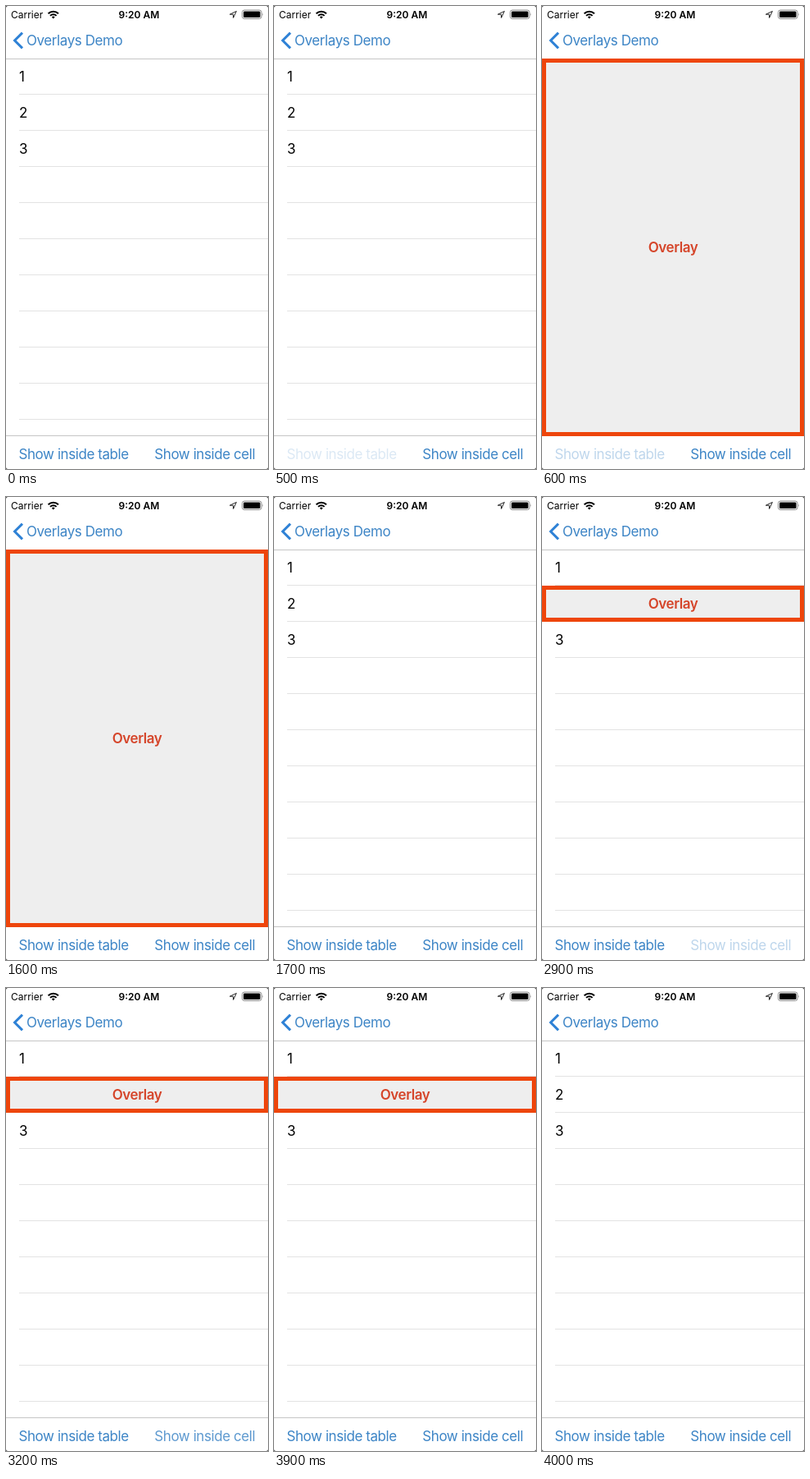
Write an HTML page that moves like this. It is 320x564 px and loops after 4.4 s.

```html
<!DOCTYPE html>
<html lang="en">
<head>
<meta charset="utf-8">
<title>Overlays Demo</title>
<style>
  html, body { margin: 0; width: 100%; height: 100%; overflow: hidden; background: #333; }
  svg { display: block; width: 100%; height: 100%; }
  text { font: 17px Inter, Roboto, sans-serif; letter-spacing: -.43px; }
  .status { font-size: 12px; letter-spacing: 0; }
  .bold { font-weight: 600; }
  .link { fill: #3d85c6; }
</style>
</head>
<body>
<svg viewBox="0 0 320 564">
  <rect width="320" height="564" rx="2.5" fill="#fff"/>

  <!-- status bar -->
  <text class="status" x="6" y="14.5">Carrier</text>
  <g fill="none" stroke="#000" stroke-width="2">
    <path d="M51.6 9.3a8.6 8.6 0 0 1 12.4 0"/>
    <path d="M54 11.9a5.4 5.4 0 0 1 7.6 0"/>
  </g>
  <path d="M55.9 13.4a2.8 2.8 0 0 1 3.8 0L57.8 15.4z"/>
  <text class="status bold" x="162.4" y="14.5" text-anchor="middle">9:20 AM</text>
  <path d="M281.4 6.4L273.4 10.2H277.6V14.4z" fill="none" stroke="#222" stroke-linejoin="round"/>
  <rect x="288.5" y="5" width="23.5" height="10.5" rx="2.6" fill="none" stroke="#888"/>
  <rect x="290" y="6.5" width="20.5" height="7.5" rx="1.3"/>
  <path d="M313.2 8.6q1.4 1.6 0 3.4z" fill="#888"/>

  <!-- navigation bar -->
  <path d="M20 32.6L10.6 42L20 51.4" fill="none" stroke="#2f82d6" stroke-width="3"/>
  <text class="link" x="25" y="48">Overlays Demo</text>

  <g id="table"></g>
  <path d="M0 64.5H320M0 523.5H320" stroke="#c6c6c6"/>

  <!-- toolbar -->
  <text class="link" id="tableButton" x="15.5" y="552">Show inside table</text>
  <text class="link" id="cellButton" x="181.3" y="552">Show inside cell</text>

  <g id="overlay">
    <rect id="panel" x="2.5" width="315" fill="#eee" stroke="#ee450b" stroke-width="5"/>
    <text id="caption" class="bold" x="160" text-anchor="middle" fill="#d5452a">Overlay</text>
  </g>
</svg>
<script>
const LOOP = 4400, STEP = 100, ROW = 44, TOP = 64;
const FADE = 400, PRESSED = 0.18, RELEASED = 0.33;
const $ = id => document.getElementById(id);

// Each tap dims its button, shows an overlay on release and hides it later.
const taps = [
  { button: $('tableButton'), press: 300, release: 600, hide: 1700, top: TOP, height: 460 },
  { button: $('cellButton'), press: 2700, release: 2900, hide: 4000, top: TOP + ROW, height: ROW }
];

let rows = '';
for (let i = 1; i <= 10; i++) {
  const bottom = TOP + i * ROW;
  rows += `<path d="M16 ${bottom - 0.5}H320" stroke="#e3e3e3"/>`;
  if (i <= 3) rows += `<text x="16" y="${bottom - 16}">${i}</text>`;
}
$('table').innerHTML = rows;

function buttonOpacity(time, { press, release }) {
  if (time < press) return 1;
  if (time < release) return PRESSED;
  return Math.min(1, RELEASED + (1 - RELEASED) * (time - release) / FADE);
}

function placeOverlay({ top, height }) {
  $('panel').setAttribute('y', top + 2.5);
  $('panel').setAttribute('height', height - 5);
  $('caption').setAttribute('y', top + height / 2 + 6);
}

function draw(now) {
  const time = Math.floor(now % LOOP / STEP) * STEP;
  for (const tap of taps) tap.button.setAttribute('opacity', buttonOpacity(time, tap));
  const active = taps.find(tap => time >= tap.release && time < tap.hide);
  $('overlay').setAttribute('visibility', active ? 'visible' : 'hidden');
  if (active) placeOverlay(active);
}

const start = performance.now();
function tick() {
  draw(performance.now() - start);
  requestAnimationFrame(tick);
}
tick();
</script>
</body>
</html>
```
